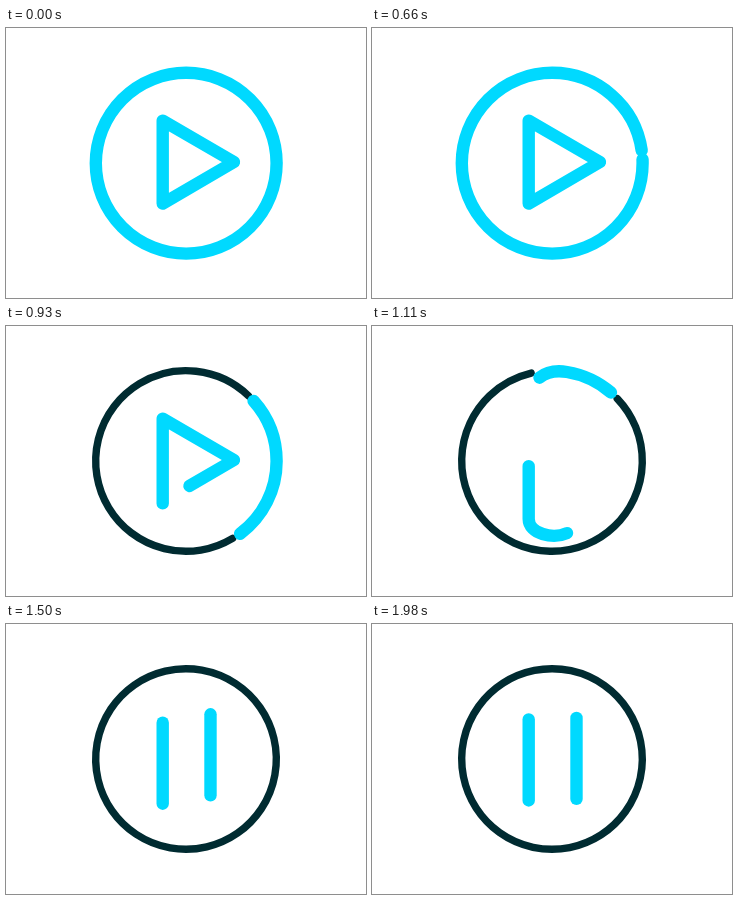
An HTML page that plays this animation: 360x270 px, repeating every 2.01 s.

```html
<!DOCTYPE html>
<html lang="en">
<head>
<meta charset="utf-8">
<title>Play to pause</title>
<style>
  html, body { margin: 0; width: 100%; height: 100%; overflow: hidden; background: #fff; }
  svg { display: block; width: 100vw; height: 100vh; }
  svg * { fill: none; stroke: #00d9ff; stroke-width: 12.4; stroke-linecap: round; stroke-linejoin: round; }
  #track { stroke: #002b31; stroke-width: 7.4; }
</style>
</head>
<body>
<svg viewBox="0 0 360 270">
  <circle id="track" cx="180" cy="135" r="90.3" pathLength="568"/>
  <!-- Ring, then a bend inward and down into the left bar -->
  <path id="ring" d="M270.6 135.2A90.4 90.4 0 0 0 89.8 135.2A90.4 90.4 0 0 0 270.6 135.2A90.4 90.4 0 0 0 195 46C175 42.7 156.7 52 156.7 78V200"/>
  <!-- Triangle, then a bend along the bottom and up into the right bar -->
  <path id="icon" d="M156.7 175.6L228 134L156.7 92.7V193C156.7 214 204.5 216 204.5 194V70"/>
</svg>
<script>
const LOOP = 2010, STEP = 30, TURN = 568, BAR = 81, EXIT = 725, PAD = 8;
const [track, ring, icon] = ['track', 'ring', 'icon'].map(id => document.getElementById(id));

// Distances along each path where the pause bars come to rest.
const leftEnd = ring.getTotalLength() - 24.8, leftTop = leftEnd - BAR;
const rightEnd = icon.getTotalLength() - 24.2, rightTop = rightEnd - BAR;
const corner = Math.hypot(71.3, 41.6) + Math.hypot(71.3, 41.3);
const closed = corner + 82.9;

const keys = {
  ringTail: [[600, 0], [690, 26], [780, 133], [930, 483], [1110, 645],
             [1230, leftTop - 42], [1380, leftTop + 5], [1500, leftTop + 3.2], [1980, leftTop]],
  ringHead: [[480, TURN], [660, TURN + 3], [780, TURN + 13.5], [930, TURN + 65], [1110, 723],
             [1230, leftEnd - 42], [1380, leftEnd + 5], [1500, leftEnd + 3.2], [1980, leftEnd]],
  iconTail: [[780, 0], [840, 4], [930, 31], [1020, 118], [1110, corner + 47.5],
             [1230, rightTop - 42], [1380, rightTop + 5], [1500, rightTop + 3.6], [1980, rightTop]],
  iconHead: [[900, closed], [960, closed + 6], [1110, closed + 64],
             [1230, rightEnd - 42], [1380, rightEnd + 5], [1500, rightEnd + 3.6], [1980, rightEnd]]
};

// Smooth interpolation that never overshoots its keys.
function at(k, t) {
  const last = k.length - 1;
  if (t <= k[0][0]) return k[0][1];
  if (t >= k[last][0]) return k[last][1];
  const slope = i => (k[i + 1][1] - k[i][1]) / (k[i + 1][0] - k[i][0]);
  const tangent = i => {
    if (i === 0 || i === last) return 0;
    const a = slope(i - 1), b = slope(i);
    return a * b > 0 ? 2 * a * b / (a + b) : 0;
  };
  const i = k.findIndex(p => p[0] > t) - 1;
  const [t0, v0] = k[i], [t1, v1] = k[i + 1];
  const d = t1 - t0, u = (t - t0) / d, u2 = u * u, u3 = u2 * u;
  return v0 + (v1 - v0) * (3 * u2 - 2 * u3)
    + d * (tangent(i) * (u3 - 2 * u2 + u) + tangent(i + 1) * (u3 - u2));
}

function trim(el, from, to) {
  el.style.visibility = to > from ? 'visible' : 'hidden';
  el.style.strokeDasharray = `${Math.max(to - from, 0)} 2000`;
  el.style.strokeDashoffset = -from;
}

function draw(t) {
  const v = name => at(keys[name], t);
  const tail = v('ringTail'), head = v('ringHead');
  trim(ring, tail, head);
  trim(icon, v('iconTail'), v('iconHead'));

  // The dark circle fills whatever the bright ring has left.
  const gap = Math.max(0, Math.min(head, EXIT) - tail + 2 * PAD);
  trim(track, 0, TURN - gap);
  track.setAttribute('transform', `rotate(${(PAD - tail) / TURN * 360} 180 135)`);
}

const start = performance.now();
function tick() {
  const t = (performance.now() - start) % LOOP;
  draw(Math.floor(t / STEP) * STEP);
  requestAnimationFrame(tick);
}
tick();
</script>
</body>
</html>
```
